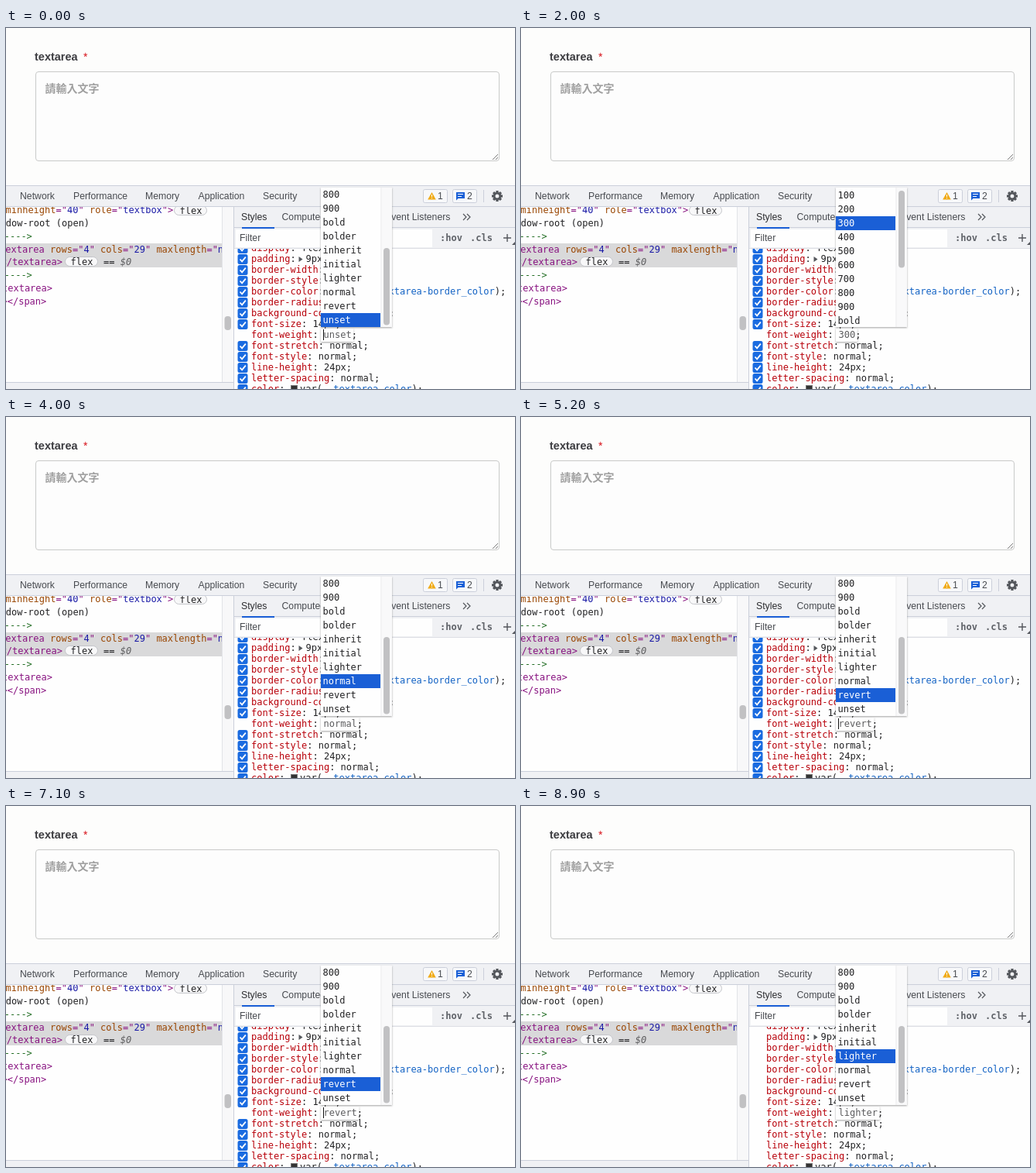
These frames come from a looping animation (658x466 px, 9000 ms). An HTML page:

```html
<!DOCTYPE html>
<html lang="zh-Hant">
<head>
<meta charset="utf-8">
<title>Font weight menu</title>
<style>
  html, body { margin: 0; width: 100%; height: 100%; overflow: hidden; background: #fdfdfc; }
  svg { display: block; width: 658px; height: 466px; }
  text { white-space: pre; fill: #222224; }
  .ui { font: 12.25px "Liberation Sans", Arial, sans-serif; fill: #484b50; }
  .mono { font: 12px "DejaVu Sans Mono", monospace; }
  .label { font: bold 14.5px "Liberation Sans", Arial, sans-serif; fill: #3c3c40; }
  .hint { font: 700 14px "Noto Sans CJK TC", "Noto Sans CJK", sans-serif; fill: #a0a0a0; }
  .prop { fill: #b8000a; }
  .tag { fill: #881280; }
  .attr { fill: #994500; }
  .val { fill: #1a1aa6; }
  .note { fill: #236e25; }
  .link { fill: #1262c4; }
  .dim { fill: #5c5c5e; }
  .tool { font-weight: bold; fill: #5f6268; }
</style>
</head>
<body>
<svg id="stage" viewBox="0 0 658 466"></svg>
<script>
const LOOP = 9000, ROW = 18, LIST_TOP = 207, END_SCROLL = 127, CHAR = 7.22;
const PANEL = '#f0f1f4', LINE = '#cbcfda', ICON = '#54575c', THUMB = '#c1c1c3', BLUE = '#1a5fd6';
const ITEMS = ['100', '200', '300', '400', '500', '600', '700', '800', '900', 'bold', 'bolder',
  'inherit', 'initial', 'lighter', 'normal', 'revert', 'unset'];

// [time, selected value]
const STEPS = [
  [100, 'unset'], [1000, '100'], [1200, '200'], [1400, '300'],
  [2400, '200'], [2600, '100'], [2800, 'unset'], [3100, 'revert'], [3400, 'normal'],
  [4800, 'revert'], [5300, 'unset'], [5500, '100'], [5700, '200'], [5900, '300'], [6100, '400'],
  [6300, '300'], [6500, '200'], [6700, '100'], [6900, 'unset'], [7050, 'revert'],
  [7800, 'normal'], [8100, 'lighter']
];
const HOVER_END = 8300;

const rect = (x, y, w, h, fill, extra = '') =>
  `<rect x="${x}" y="${y}" width="${w}" height="${h}" fill="${fill}" ${extra}/>`;
const path = (d, extra) => `<path d="${d}" ${extra}/>`;
const text = (x, y, str, cls = 'mono', extra = '') =>
  `<text x="${x}" y="${y}" class="${cls}" ${extra}>${str}</text>`;
const span = (cls, str) => `<tspan class="${cls}">${str}</tspan>`;
const attr = (name, value) => span('attr', name) + span('tag', '="') + span('val', value) + span('tag', '"');
const pill = (x, y) =>
  rect(x + .5, y + .5, 42, 12, '#f8f8f9', 'rx="6" stroke="#c4c5ca"') + text(x + 7.5, y + 10.5, 'flex');
const tick = y => rect(299.5, y - 6.5, 13, 13, '#1a6be0', 'rx="2.5"') +
  path(`M302.5 ${y}l2.6 2.8 4.7-5.6`, 'fill="none" stroke="#fff" stroke-width="1.8"');

function page() {
  return text(37, 42, 'textarea', 'label') +
    text(100, 42, '*', 'ui', 'style="fill:#d8141c;font-size:14px"') +
    rect(38.5, 56.5, 599, 115, '#fdfdfd', 'rx="3.5" stroke="#c9cac9"') +
    text(50.5, 83, '請輸入文字', 'hint') +
    path('M629 170l7-7M633 170l3-3', 'stroke="#7a7a7a" fill="none"');
}

function toolbar() {
  const tabs = [[18, 'Network'], [87, 'Performance'], [180, 'Memory'], [248.5, 'Application'], [332, 'Security']];
  const badge = x => rect(x + .5, 208.5, 31, 17, '#f7f8fa', `rx="2" stroke="${LINE}"`);
  const teeth = Array.from({ length: 8 }, (_, i) =>
    rect(633.4, 210, 3.2, 4, ICON, `transform="rotate(${i * 45} 635 217)"`)).join('');
  return rect(0, 203, 658, 263, PANEL) + rect(0, 203, 658, 1, LINE) + rect(0, 230, 658, 1, LINE) +
    tabs.map(([x, s]) => text(x, 221, s, 'ui')).join('') +
    badge(539) + path('M550.5 212l5.3 9.5h-10.6z', 'fill="#f0ab18"') +
    rect(550, 215, 1, 3, '#fff') + rect(550, 219, 1, 1, '#fff') + text(558, 221, '1', 'ui') +
    badge(577) + path('M582 212h11v8h-8.5l-2.5 2.5z', `fill="${BLUE}"`) +
    path('M584 214.5h7M584 217.5h5', 'stroke="#fff"') + text(596, 221, '2', 'ui') +
    rect(617, 209, 1, 16, LINE) + teeth +
    `<circle cx="635" cy="217" r="3.9" fill="none" stroke="${ICON}" stroke-width="2.8"/>`;
}

function elements() {
  return rect(0, 231, 279, 226, '#fefefe') + rect(0, 278, 279, 31, '#d9d9da') +
    rect(279, 231, 15, 226, '#f8f8f9') + rect(279, 231, 1, 226, '#e2e3e7') +
    rect(0, 457, 294, 1, LINE) + rect(282.5, 372, 8.5, 18, THUMB, 'rx="4"') +
    '<g clip-path="url(#tree)">' +
    text(-.5, 239, attr('minheight', '40') + ' ' + attr('role', 'textbox') + span('tag', '>')) + pill(217, 229) +
    text(-7.5, 256, 'ndow-root (open)') +
    text(-9.5, 273, '-----&gt;', 'mono note') +
    text(-8, 290, span('tag', 'textarea ') + attr('rows', '4') + ' ' + attr('cols', '29') + ' ' +
      span('attr', 'maxlength') + span('tag', '="') + span('val', 'n')) +
    text(-6.5, 306, span('tag', '&lt;/textarea&gt;')) + pill(76, 295) +
    text(126, 306, '== <tspan class="dim" font-style="italic">$0</tspan>') +
    text(-9.5, 323, '-----&gt;', 'mono note') +
    text(-5, 340, span('tag', 'textarea&gt;')) +
    text(-5.5, 357, span('tag', '&gt;&lt;/span&gt;')) + '</g>';
}

function styles() {
  const rules = [['display', 'flex;'], ['padding', ''], ['border-width', ''], ['border-style', ''],
    ['border-color', ''], ['border-radius', ''], ['background-color', ''], ['font-size', '14px;'],
    ['font-weight', ''], ['font-stretch', 'normal;'], ['font-style', 'normal;'], ['line-height', '24px;'],
    ['letter-spacing', 'normal;'], ['color', '']];
  const rowY = i => 284 + 14 * i;
  return rect(294, 231, 1, 235, LINE) +
    text(304, 248, 'Styles', 'ui', 'style="fill:#2c2d30"') + text(356.5, 248, 'Computed', 'ui') +
    text(490, 248, 'Event Listeners', 'ui') +
    path('M591 240l4 4-4 4M596 240l4 4-4 4', `fill="none" stroke="${ICON}" stroke-width="1.2"`) +
    rect(295, 257, 363, 1, LINE) + rect(305, 257, 42, 2, BLUE) +
    rect(297, 260, 254, 23, '#fefefe') + text(302, 275, 'Filter', 'ui') +
    text(561, 275, ':hov', 'mono tool') + text(600, 275, '.cls', 'mono tool') +
    path('M643 271h10M648 266v10', `stroke="${ICON}" stroke-width="1.4"`) +
    path('M658 276v4h-4z', `fill="${ICON}"`) +
    rect(295, 284, 363, 182, '#fefefe') + rect(295, 284, 363, 1, '#dcdee4') +
    '<g clip-path="url(#rules)">' +
    rules.map(([name, value], i) =>
      text(317, rowY(i) + 4, span('prop', name) + ': ' + value)).join('') +
    `<g id="ticks">${rules.map(([name], i) => name === 'font-weight' ? '' : tick(rowY(i) + .5)).join('')}</g>` +
    path('M378.5 295l5 3.5-5 3.5z', `fill="${ICON}"`) + text(387.5, 302, '9px') +
    text(494.5, 344, span('link', 'xtarea-border_color') + ');') + text(495, 372, ';') +
    rect(368.5, 461.5, 8, 8, '#333', 'stroke="#777"') +
    text(380, 470, 'var(' + span('link', '--textarea-color') + ');') + '</g>';
}

function menu() {
  const rows = ITEMS.map((s, i) => text(409.5, LIST_TOP + ROW * i + 13, s)).join('');
  return '<g filter="url(#shadow)">' + rect(407, 388, 0, 17, '#fefefe', 'id="field"') + '</g>' +
    text(410.5, 400, '', 'mono', 'id="value"') + rect(410, 389, 1, 14, '#111', 'id="caret"') +
    '<g filter="url(#shadow)">' + rect(407, 206, 92, 180, '#fefefe') + '</g>' +
    rect(485, 206, 14, 180, '#f9f9fa') + rect(484.5, 206, .8, 180, '#e8e8ea') +
    rect(488, 210, 8, 99.5, THUMB, 'rx="4" id="thumb"') +
    `<g clip-path="url(#list)"><g id="rows">${rect(407, 0, 77, ROW, BLUE, 'id="bar"')}${rows}</g></g>`;
}

const clip = (id, x, y, w, h) => `<clipPath id="${id}">${rect(x, y, w, h, '#000')}</clipPath>`;
const stage = document.getElementById('stage');
stage.innerHTML = '<defs>' + clip('tree', 0, 231, 279, 226) + clip('rules', 295, 285, 363, 181) +
  clip('list', 407, 206, 78, 180) +
  '<filter id="shadow" x="-20%" y="-20%" width="140%" height="150%">' +
  '<feDropShadow dx="0" dy="1" stdDeviation="1.3" flood-color="#444" flood-opacity=".5"/></filter></defs>' +
  page() + toolbar() + elements() + styles() + menu();

const part = Object.fromEntries(['ticks', 'field', 'value', 'caret', 'thumb', 'rows', 'bar']
  .map(id => [id, document.getElementById(id)]));
const labels = [...part.rows.querySelectorAll('text')];
let shown = '';

function select(name) {
  if (name === shown) return;
  shown = name;
  const index = ITEMS.indexOf(name), atEnd = index >= 7;
  part.rows.setAttribute('transform', `translate(0 ${atEnd ? -END_SCROLL : 0})`);
  part.thumb.setAttribute('y', atEnd ? 284 : 210);
  part.bar.setAttribute('y', LIST_TOP + ROW * index);
  labels.forEach((label, i) => { label.style.fill = i === index ? '#fff' : ''; });
  part.value.innerHTML = span('dim', name) + ';';
  part.field.setAttribute('width', name.length * CHAR + 6);
}

function draw(now) {
  const t = now % LOOP;
  const [since, name] = STEPS.findLast(([time]) => time <= t) || [0, 'unset'];
  select(name);
  // the caret restarts its blink on every key press
  part.caret.style.display = (t - since) % 1000 < 500 ? '' : 'none';
  part.ticks.style.display = t < HOVER_END ? '' : 'none';
}

const start = performance.now();
function nextFrame() {
  draw(performance.now() - start);
  requestAnimationFrame(nextFrame);
}
nextFrame();
</script>
</body>
</html>
```
